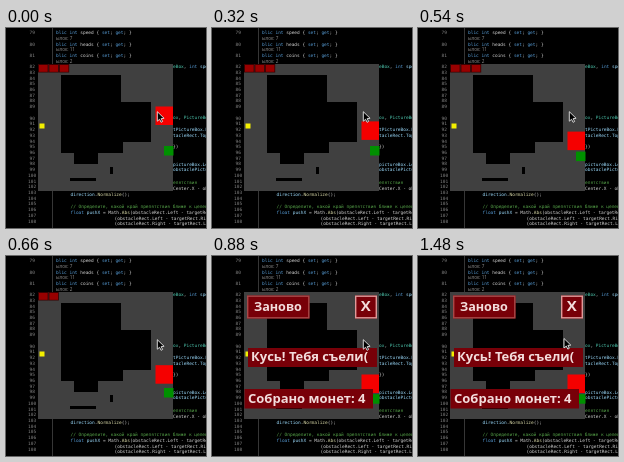
An HTML page with a canvas for the animation above (1.5 s loop, 200 by 200 pixels).

```html
<!DOCTYPE html>
<html lang="ru">
<meta charset="utf-8">
<style>
html, body { margin: 0; height: 100%; overflow: hidden; background: #000 }
canvas { display: block }
</style>
<canvas id="stage" width="200" height="200"></canvas>
<script>
const g = document.getElementById('stage').getContext('2d');
const LOOP = 1500, TICK = 20, OVER = 860, ROW = 5.72, CHAR = 2.7;
const WHITE = '#d4d4d4', BLUE = '#569cd6', VAR = '#9cdcfe', TYPE = '#4ec9b0',
      CALL = '#dcdcaa', NOTE = '#57a64a', DIM = '#858585', LENS = '#909090';

const rect = (color, x, y, w, h) => {
  g.fillStyle = color;
  g.fillRect(x, y, w, h);
};

const text = (s, x, y, color, font) => {
  g.font = font;
  g.fillStyle = color;
  g.fillText(s, x, y);
};

// Parts alternate colour and string along one line of code.
const code = (x, y, ...parts) => {
  for (let i = 0; i < parts.length; i += 2) {
    text(parts[i + 1], x, y, parts[i], `${CHAR / 0.602}px "DejaVu Sans Mono", monospace`);
    x += parts[i + 1].length * CHAR;
  }
};

function editor() {
  rect('#000', 0, 0, 200, 200);
  rect('#363636', 46, 0, 1, 200);
  [['speed', 7], ['heads', 11], ['coins', 2]].forEach(([name, refs], i) => {
    const y = 5 + i * ROW * 2;
    code(23.5, y, DIM, String(79 + i));
    code(50, y, BLUE, 'blic int ', WHITE, name + ' { ', BLUE, 'set', WHITE, '; ', BLUE, 'get', WHITE, '; }');
    text('ылок: ' + refs, 50, y + ROW, LENS, '4.6px "Open Sans", sans-serif');
  });
  for (let n = 82; n < 109; n++) {
    const row = n - 82 + (n > 89);
    code(n > 99 ? 22 : 23.5, 39 + row * ROW, DIM, String(n));
  }
  code(167, 39, TYPE, 'eBox', WHITE, ', ', BLUE, 'int', VAR, ' speed');
  code(167, 90, TYPE, 'ox', WHITE, ', ', TYPE, 'PictureBox');
  code(167, 102, VAR, 'tPictureBox.Left');
  code(167, 107.5, VAR, 'tacleRect.Top');
  code(167, 119, WHITE, '})');
  code(167, 136.5, VAR, 'pictureBox.Left');
  code(167, 142, VAR, 'obstaclePicture');
  code(167, 155, NOTE, 'епятствия');
  code(167, 161, WHITE, 'Center.X - obstacle');
  code(64.5, 167, VAR, 'direction', WHITE, '.', CALL, 'Normalize', WHITE, '();');
  code(64.5, 178.5, NOTE, '// Определите, какой край препятствия ближе к целевому');
  code(64.5, 184.5, BLUE, 'float', VAR, ' pushX', WHITE, ' = Math.', CALL, 'Abs',
    WHITE, '(obstacleRect.Left - targetRect.Right');
  code(108.5, 190.5, WHITE, '(obstacleRect.Left - targetRect.Right');
  code(108.5, 196.3, WHITE, '(obstacleRect.Right - targetRect.Left');
}

function maze() {
  rect('#404040', 32, 36, 135, 127);
  const wall = [55,47, 115,47, 115,74, 145,74, 145,114, 117,114, 117,125, 92,125,
    92,136, 68,136, 68,125, 55,125];
  g.fillStyle = '#000';
  g.beginPath();
  for (let i = 0; i < wall.length; i += 2) g.lineTo(wall[i], wall[i + 1]);
  g.fill();
  rect('#000', 64, 150, 26, 3);
  rect('#000', 104, 139, 3, 7);
}

function game(t) {
  maze();
  const lives = t < 560 ? 3 : 2;
  if (t < OVER) for (let i = 0; i < lives; i++) {
    rect('#3a0000', 32 + i * 10.4, 36, 10.4, 8.5);
    rect('#980000', 33 + i * 10.4, 37, 8.6, 6.8);
  }
  rect('#f4f000', 33.5, 95.5, 5, 5);
  const s = Math.min(t, OVER);
  const green = s < 460 ? 118 : s < 660 ? 118 + (s - 460) * 0.07 : 132 + (s - 660) * 0.031;
  rect('#009000', 158, green, 9.5, 9.5);
  rect('#f50000', 149.5, 78.5 + s * 0.0465, 17.5, 18.5);
}

function panel(s, x, y, w, h, tx, size, border) {
  rect('#780008', x, y, w, h);
  if (border) {
    g.strokeStyle = border;
    g.lineWidth = 1.4;
    g.strokeRect(x + 0.7, y + 0.7, w - 1.4, h - 1.4);
  }
  text(s, tx, y + h / 2 + 0.5, '#f3dcdc', `700 ${size}px "Open Sans", sans-serif`);
}

function gameOver() {
  panel('Заново', 35, 39.5, 62.5, 23, 42, 12.6, '#a84848');
  panel('X', 143, 39.5, 22, 23, 148.8, 15, '#e09a9a');
  panel('Кусь! Тебя съели(', 36, 92, 129, 19, 39, 13);
  panel('Собрано монет: 4', 32.5, 133, 128.5, 19.5, 36, 13);
}

function cursor(x, y) {
  g.beginPath();
  for (const [dx, dy] of [[0, 0], [0, 9.5], [2.3, 7.6], [3.8, 10.6], [5.3, 9.8], [3.9, 6.9], [6.8, 6.6]])
    g.lineTo(x + dx, y + dy);
  g.closePath();
  g.fillStyle = '#000';
  g.strokeStyle = '#e8e8e8';
  g.lineWidth = 0.9;
  g.fill();
  g.stroke();
}

function frame(now) {
  const t = Math.floor(now % LOOP / TICK) * TICK;
  g.textBaseline = 'middle';
  editor();
  game(t);
  if (t >= OVER) gameOver();
  cursor(t < 1460 ? 151.3 : t < 1480 ? 149 : 146, t < 1460 ? 83.7 : 82.5);
  requestAnimationFrame(frame);
}
frame(0);
</script>
</html>
```
